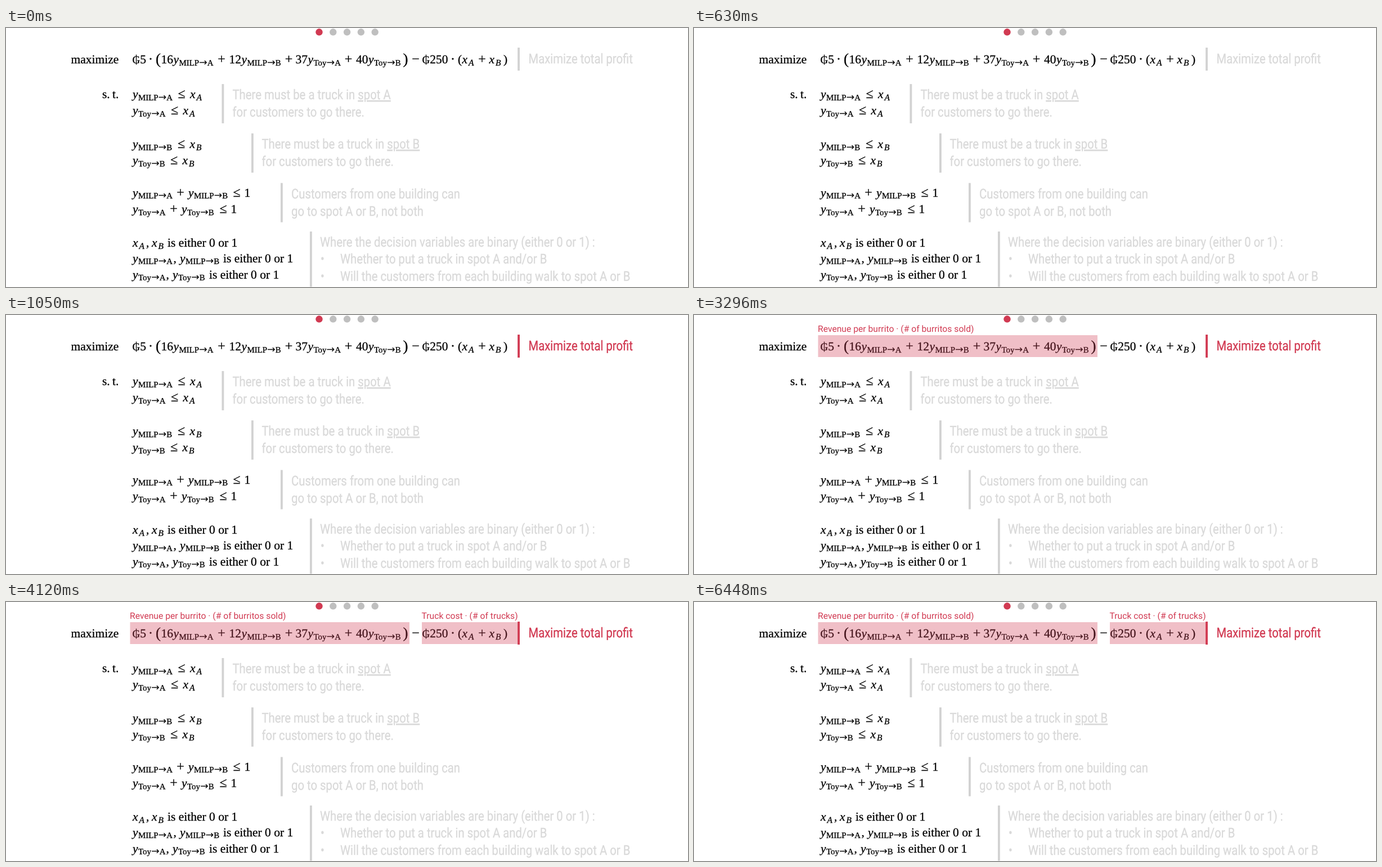
Animation, 1212 px wide and 462 px high, one loop 8000 ms. Source, as an HTML page:

```html
<!DOCTYPE html>
<html lang="en">
<head>
<meta charset="utf-8">
<title>Truck placement model</title>
<style>
  html, body { margin: 0; width: 100%; height: 100%; overflow: hidden; background: #fff; }
  svg { display: block; }
  text { white-space: pre; text-rendering: geometricPrecision; }
  .math { font-family: "Liberation Serif", "Times New Roman", serif; fill: #000; stroke: #000; stroke-width: .3; }
  .roman, .var { font-size: 21.5px; }
  .var, .subvar { font-style: italic; }
  .sub { font-size: 14.9px; }
  .subvar { font-size: 15.5px; }
  .arrow { font: 17.5px "DejaVu Sans", sans-serif; stroke: none; }
  .op { font-size: 24px; text-anchor: middle; }
  .big { font-size: 27px; }
  .coin { font-size: 19px; }
  .note { font: 24px Roboto, sans-serif; fill: #d9d9d9; stroke: #d9d9d9; stroke-width: .35; }
  .under { text-decoration: underline 2px; text-underline-offset: 3px; }
  .bar { fill: #d2d2d2; }
  .dot { fill: #bfbfbf; }
  .label { font: 15.7px Roboto, sans-serif; fill: #d13a52; }
  .box { fill: #d13a52; fill-opacity: .32; }
  .on .note { fill: #d13a52; stroke: #d13a52; }
  .on .bar, .dot.on { fill: #d13a52; }
</style>
</head>
<body>
<svg id="stage" width="1212" height="462" viewBox="0 0 1212 462"></svg>
<script>
const LOOP = 8000;
const stage = document.getElementById("stage");

function add(parent, tag, attrs = {}, text = "") {
  const el = document.createElementNS("http://www.w3.org/2000/svg", tag);
  for (const key in attrs) el.setAttribute(key, attrs[key]);
  el.textContent = text;
  return parent.appendChild(el);
}

const math = add(stage, "g", { class: "math" });
const put = (x, y, text, style = "roman") => add(math, "text", { x, y, class: style }, text);

// Walk choice: y with an upright route below; truck choice: x with an italic spot below.
function walk(x, y, from, to) {
  put(x, y, "y", "var");
  const route = put(x + 10, y + 3.6, from, "sub");
  add(route, "tspan", { class: "arrow" }, "→");
  add(route, "tspan", {}, to);
}
function truck(x, y, spot) {
  put(x, y, "x", "var");
  put(x + 11.5, y + 3.6, spot, "subvar");
}
function coin(x, y) {
  put(x, y, "G", "coin");
  add(math, "path", { d: `M${x + 7} ${y - 15.5}v18`, "stroke-width": 1.3 });
}
const op = (x, y, sign) => put(x, y, sign, "op");

function objective(y) {
  put(115.5, y, "maximize");
  coin(224.5, y);
  put(238.3, y, "5");
  op(257, y, "·");
  put(266, y + .5, "(", "big");
  const terms = [[275.5, "16", "MILP", "A"], [396.5, "12", "MILP", "B"], [514.5, "37", "Toy", "A"], [622, "40", "Toy", "B"]];
  for (const [x, count, from, to] of terms) {
    put(x, y, count);
    walk(x + 22, y, from, to);
  }
  for (const x of [383, 502.5, 608.5, 846]) op(x, y, "+");
  put(705.5, y + .5, ")", "big");
  op(728, y, "−");
  coin(739.5, y);
  put(753.3, y, "250");
  op(794, y, "·");
  put(803, y, "(");
  truck(810.5, y, "A");
  truck(858.5, y, "B");
  put(884, y, ")");
}

function needsTruck(y, from, spot, sign) {
  walk(225, y, from, spot);
  op(sign, y, "≤");
  truck(sign + 15, y, spot);
}

function oneSpot(y, from, plus, sign) {
  walk(225, y, from, "A");
  op(plus, y, "+");
  walk(plus + 14, y, from, "B");
  op(sign, y, "≤");
  put(sign + 13.5, y, "1");
}

function binaryWalk(y, from, comma, tail) {
  walk(225, y, from, "A");
  put(comma, y, ",");
  walk(comma + 11.5, y, from, "B");
  put(tail, y, "is either 0 or 1");
}

objective(63);
put(171, 125, "s.\u2009t.");
needsTruck(125.3, "MILP", "A", 312);
needsTruck(154, "Toy", "A", 299.5);
needsTruck(214.3, "MILP", "B", 311.5);
needsTruck(243, "Toy", "B", 298.5);
oneSpot(300.6, "MILP", 310, 410);
oneSpot(330, "Toy", 298, 386);
truck(225, 390, "A");
put(249, 390, ",");
truck(259, 390, "B");
put(287, 390, "is either 0 or 1");
binaryWalk(417.5, "MILP", 297.5, 386);
binaryWalk(446.5, "Toy", 284.5, 361);

// All side notes share one condensed face.
function note(parent, x, y, text, underlined) {
  const el = add(parent, "text", { class: "note", transform: `translate(${x} ${y}) scale(.846 1)` }, text);
  if (underlined) add(el, "tspan", { class: "under" }, underlined);
}
const bar = (parent, x, y, height) => add(parent, "rect", { class: "bar", x, y, width: 3.8, height });

bar(stage, 383.5, 100, 70);
note(stage, 402.5, 127, "There must be a truck in ", "spot A");
note(stage, 402.5, 158, "for customers to go there.");
bar(stage, 436, 188, 70);
note(stage, 454.5, 215, "There must be a truck in ", "spot B");
note(stage, 454.5, 246, "for customers to go there.");
bar(stage, 488, 276.5, 70);
note(stage, 507, 303.5, "Customers from one building can");
note(stage, 507, 334.5, "go to spot A or B, not both");
bar(stage, 540, 363, 98.5);
note(stage, 558, 389.5, "Where the decision variables are binary (either 0 or 1) :");
note(stage, 559, 420, "•");
note(stage, 594, 420, "Whether to put a truck in spot A and/or B");
note(stage, 559, 451, "•");
note(stage, 594, 451, "Will the customers from each building walk to spot A or B");

for (let i = 0; i < 5; i++)
  add(stage, "circle", { class: i ? "dot" : "dot on", cx: 556.5 + 24.8 * i, cy: 7.3, r: 6.2 });

function term(x, width, text) {
  const group = add(stage, "g");
  add(group, "rect", { class: "box", x, y: 36, width, height: 39 });
  add(group, "text", { class: "label", x: x - .5, y: 30 }, text);
  return group;
}
function goal(style) {
  const group = add(stage, "g", { class: style });
  bar(group, 909.2, 35, 41);
  note(group, 928.5, 63, "Maximize total profit");
  return group;
}

const revenue = term(220.5, 496.5, "Revenue per burrito · (# of burritos sold)");
const cost = term(739, 172.5, "Truck cost · (# of trucks)");
const goalOff = goal("off");
const goalOn = goal("on");

const steps = [
  [goalOff, 0, 1050],
  [goalOn, 1050, LOOP],
  [revenue, 2060, LOOP],
  [cost, 4120, LOOP],
];
const start = performance.now();
function draw(now) {
  const t = Math.max(0, now - start) % LOOP;
  for (const [el, from, to] of steps)
    el.style.visibility = t >= from && t < to ? "visible" : "hidden";
  requestAnimationFrame(draw);
}
draw(start);
</script>
</body>
</html>
```
